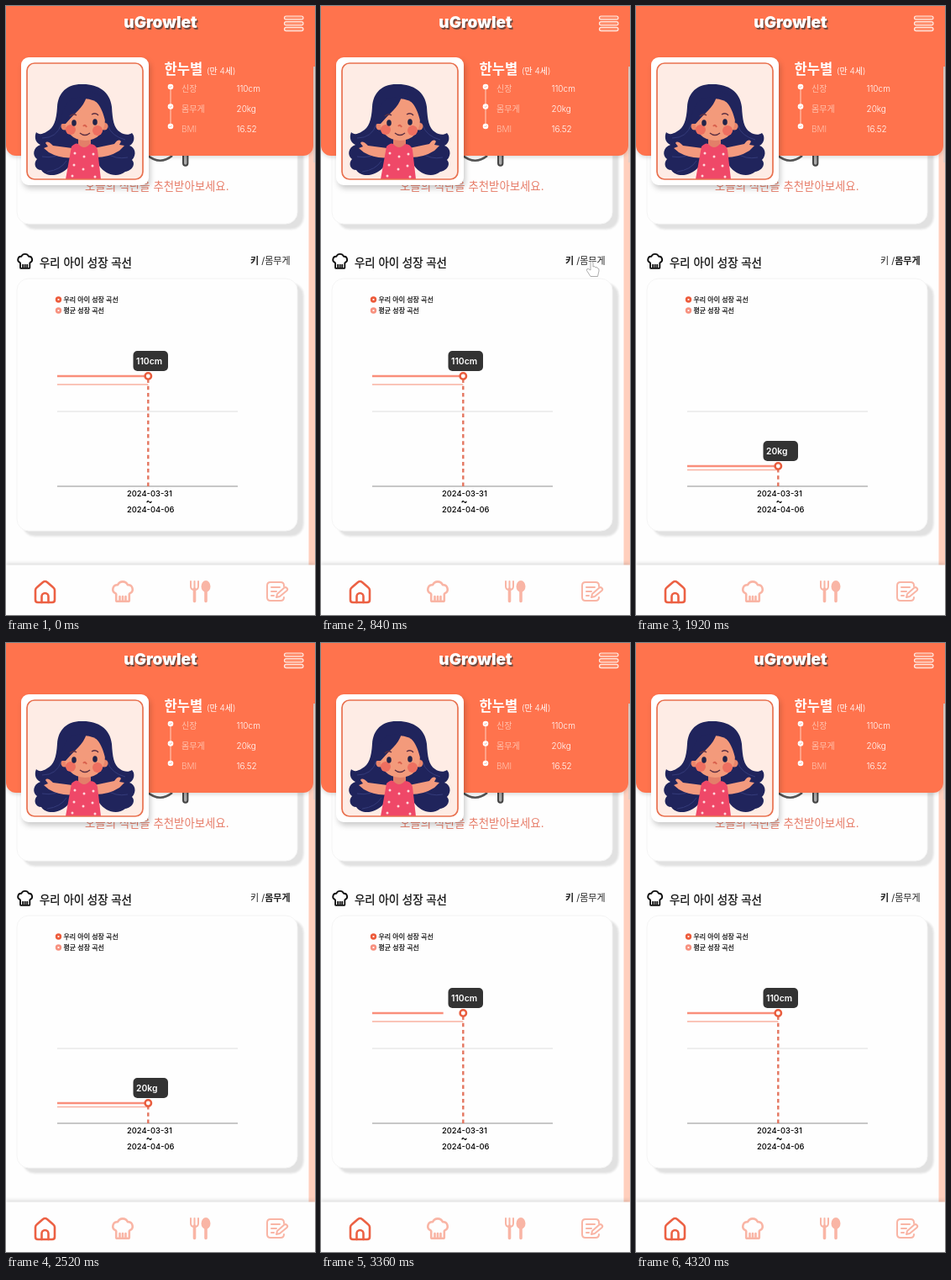
Recreate the animation shown at these times as an HTML page. Size 368 by 724 pixels, loop 4.56 s.

```html
<!DOCTYPE html>
<html lang="ko">
<head>
<meta charset="utf-8">
<title>성장 곡선</title>
<style>
  html, body { margin: 0; width: 100%; height: 100%; overflow: hidden; background: #fefefe; }
  svg { display: block; width: 100%; height: 100%; }
  text { font-family: Inter, "Noto Sans CJK KR", "Noto Sans CJK", sans-serif; white-space: pre; }
  .card { fill: #fefefe; stroke: #f4f4f4; filter: drop-shadow(7px 6px 1px #e1e1e1); }
  .photo { fill: #fff; filter: drop-shadow(2px 4px 3px #0003); }
  .icon { fill: none; stroke-width: 2; stroke-linecap: round; stroke-linejoin: round; }
  .home { stroke: #ec6144; stroke-width: 2.6; }
  .salmon { stroke: #f9b5a5; }
  .light { fill: #fff; font-size: 10px; font-weight: 300; }
  .label { fill: #ffc3af; font-size: 10px; font-weight: 300; }
  .medium { stroke: #111; stroke-width: .3; }
  .legend { font-size: 8px; font-weight: 500; stroke-width: .2; }
  .date { font-size: 9.4px; font-weight: 500; }
</style>
</head>
<body>
<svg viewBox="0 0 368 724" preserveAspectRatio="none">
  <defs>
    <path id="chef" d="M17 21a1 1 0 0 0 1-1v-5.4c0-.4.3-.8.7-1a4 4 0 0 0-2.1-7.6a5 5 0 0 0-9.2 0a4 4 0 0 0-2.1 7.6c.4.2.7.6.7 1V20a1 1 0 0 0 1 1ZM9.300 20.500v-4M12 20.500v-4M14.700 20.500v-4"/>
    <clipPath id="frame"><rect x="25" y="68" width="138" height="138" rx="9"/></clipPath>
  </defs>

  <rect width="368" height="724" fill="#fefefe"/>
  <rect x="360.5" y="72" width="8" height="594" fill="#ffcfbd"/>
  <path d="M367 72V186" stroke="#e3cfc8" stroke-width="2"/>

  <!-- meal card -->
  <rect class="card" x="13" y="120" width="334" height="139" rx="14"/>
  <path d="M168 177Q183 190 198 178" fill="none" stroke="#555" stroke-width="2.5"/>
  <path d="M211 170V187a2.7 2.7 0 0 0 5.4 0V170" fill="#aaa" stroke="#444" stroke-width="2"/>
  <text x="94" y="219" font-size="13.4" fill="#e77c68">오늘의 식단을 추천받아보세요.</text>

  <!-- header -->
  <path d="M0 0H368V72H366V166a12 12 0 0 1-12 12H12a12 12 0 0 1-12-12Z" fill="#ff734d" style="filter:drop-shadow(0 2px 2px #0002)"/>
  <text x="184" y="26" text-anchor="middle" font-size="19" font-weight="900" fill="#fff" style="text-shadow:1.5px 1.5px 0 #70483d">uGrowlet</text>
  <g fill="#ff8e6d" stroke="#ffe9e1" stroke-width="1.2">
    <rect x="331.5" y="12" width="22.5" height="4.2" rx="2.1"/>
    <rect x="331.5" y="18.7" width="22.5" height="4.2" rx="2.1"/>
    <rect x="331.5" y="25.4" width="22.5" height="4.2" rx="2.1"/>
  </g>
  <text x="188.5" y="81" font-size="16.6" font-weight="700" fill="#fff">한누별</text>
  <text x="239" y="81" class="light">(만 4세)</text>
  <path d="M196 96V143" stroke="#ffd3c4"/>
  <g fill="#fff">
    <circle cx="196" cy="96" r="3.3"/><circle cx="196" cy="119.5" r="3.3"/><circle cx="196" cy="143" r="3.3"/>
  </g>
  <path d="M194.5 96l1 1 2-2M194.5 119.5l1 1 2-2M194.5 143l1 1 2-2" fill="none" stroke="#ff9b7f" stroke-width=".8"/>
  <text x="209" y="101.5" class="label">신장</text><text x="274.5" y="101.5" class="light">110cm</text>
  <text x="209" y="125.5" class="label">몸무게</text><text x="274.5" y="125.5" class="light">20kg</text>
  <text x="209" y="149.5" class="label">BMI</text><text x="274.5" y="149.5" class="light">16.52</text>

  <!-- portrait -->
  <rect class="photo" x="18" y="61" width="152" height="152" rx="9"/>
  <g clip-path="url(#frame)">
    <rect x="25" y="68" width="138" height="138" fill="#feece5"/>
    <path d="M92 93C74 92 62 102 61 120C60 136 57 145 49 149C43 153 39 153 36 150C33 157 36 163 41 165C32 168 31 178 37 182C32 187 35 195 42 195C48 204 64 203 74 192L111 190C118 200 132 205 142 197C150 196 155 188 150 183C156 177 154 168 147 166C153 163 154 155 150 151C146 154 140 153 136 150C128 145 127 135 126 120C124 102 110 93 92 93Z" fill="#20245c"/>
    <path d="M43 157Q61 157 66 140M43 179Q60 182 69 172M142 159Q126 155 121 142M145 180Q130 183 119 174M49 197Q65 195 72 184" fill="none" stroke="#343b7a"/>
    <path d="M79 169L56 166Q49 159 47 163L50 167L45 169L51 174Q65 182 81 180ZM105 169L129 164Q134 157 137 161L135 165L141 166L135 172Q121 181 103 180Z" fill="#f39a7e"/>
    <path d="M86 155H101V172H86Z" fill="#e37f69"/>
    <path d="M78 167Q83 162 86 164Q93 172 100 164Q107 164 109 171L113 206H71Z" fill="#ef4868"/>
    <g fill="#ffd8dc">
      <circle cx="82" cy="175" r="1.5"/><circle cx="93" cy="179" r="1.5"/><circle cx="104" cy="176" r="1.5"/>
      <circle cx="81" cy="189" r="1.5"/><circle cx="92" cy="194" r="1.5"/><circle cx="103" cy="190" r="1.5"/>
      <circle cx="79" cy="202" r="1.5"/><circle cx="106" cy="203" r="1.5"/>
    </g>
    <circle cx="70" cy="143" r="4.5" fill="#ea866b"/><circle cx="117" cy="143" r="4.5" fill="#ea866b"/>
    <path d="M69 132Q69 112 93 110Q118 112 118 135Q117 159 94 160Q71 159 69 132Z" fill="#f39a7b"/>
    <path d="M66 140C66 117 75 107 96 108C92 121 82 127 71 140ZM93 107C109 109 115 122 119 140C126 124 118 104 99 101Z" fill="#20245c"/>
    <circle cx="77" cy="147" r="6" fill="#ee6f60"/><circle cx="109" cy="148" r="6" fill="#ee6f60"/>
    <ellipse cx="81" cy="139" rx="2.8" ry="3.8" fill="#222449"/><ellipse cx="106" cy="138" rx="2.8" ry="3.8" fill="#222449"/>
    <path d="M76 131Q80 127 84 130M102 129Q107 126 110 130M88 151Q94 156 100 151" fill="none" stroke="#5d3042" stroke-width="1.4"/>
    <path d="M92 143Q94 140 96 144" fill="none" stroke="#d9614e" stroke-width="2"/>
  </g>
  <rect x="25" y="68" width="138" height="138" rx="9" fill="none" stroke="#e9714f" stroke-width="1.7"/>

  <!-- growth section -->
  <use href="#chef" class="icon" stroke="#111" transform="translate(11.4 292.1) scale(.94)"/>
  <text x="40" y="310" class="medium" font-size="13.4" fill="#111">우리 아이 성장 곡선</text>
  <text x="291" y="307" font-size="11" fill="#222"><tspan id="heightTab">키</tspan> /<tspan id="weightTab">몸무게</tspan></text>
  <rect class="card" x="13" y="324" width="334" height="300" rx="14"/>
  <g fill="#fff" stroke-width="2.6">
    <circle cx="62.5" cy="349" r="2.4" stroke="#ed5b3b"/><circle cx="62.5" cy="362" r="2.4" stroke="#f7917f"/>
  </g>
  <text x="68.5" y="352" class="medium legend">우리 아이 성장 곡선</text>
  <text x="68.5" y="365" class="medium legend">평균 성장 곡선</text>
  <path d="M61 482H276" stroke="#dedede"/>
  <path d="M61 571H276" stroke="#b5b5b5" stroke-width="1.3"/>
  <path id="average" stroke="#f8b0a1" stroke-width="1.7"/>
  <path id="growth" stroke="#f98e7b" stroke-width="2.4"/>
  <path id="drop" stroke="#e4755f" stroke-width="2.4" stroke-dasharray="4.5 3.7"/>
  <g id="marker">
    <circle cx="169.3" cy="440" r="3.7" fill="#fff" stroke="#e95d3e" stroke-width="2.5"/>
    <rect x="151.5" y="410" width="41.5" height="24" rx="5" fill="#333"/>
    <text id="value" x="155" y="426" font-size="10.4" font-weight="600" fill="#fff"></text>
  </g>
  <text x="144" y="583" class="date">2024-03-31</text>
  <text x="170.5" y="593" font-size="12" font-weight="600" text-anchor="middle">~</text>
  <text x="144" y="601.5" class="date">2024-04-06</text>

  <!-- navigation -->
  <rect y="664.5" width="368" height="60" fill="#fefefe" style="filter:drop-shadow(0 -2px 2px #0002)"/>
  <g class="icon home">
    <path d="M35 694.5Q35 692.5 37 691L44 685Q46.5 683 49 685L56 691Q58 692.5 58 694.5V706Q58 709 55 709H38Q35 709 35 706Z"/>
    <path d="M42.5 709V702a4 4 0 0 1 8 0V709"/>
  </g>
  <use href="#chef" class="icon salmon" transform="translate(123.4 680.5) scale(1.3)"/>
  <g class="icon salmon">
    <path d="M220 684V690Q220 694 224.5 694Q229 694 229 690V684M224.5 684V694"/>
    <path d="M224.5 693V707.5M238 696V707.5" style="stroke-width:3.6"/>
    <ellipse cx="238" cy="690" rx="4.5" ry="6" fill="#f9b5a5"/>
    <path d="M331 690V689Q331 685 327 685H315Q311 685 311 689V703Q311 707 315 707H327Q331 707 331 703M316 691H326M316 696H322M316 701H319"/>
    <path d="M322 703L323 699L331.5 691.5Q333 690.5 334.5 692Q336 693.5 334.5 695L326 702Z"/>
  </g>

  <path id="cursor" d="M298 314V305.5Q298 303.5 299.5 303.5Q301 303.5 301 305.5V310Q303 308.5 304 311Q306 309.5 306.5 312Q308.5 311.5 308 315L306.5 321.5H298L293.5 314.5Q293 312 295.5 312.5Z" fill="#fff" stroke="#999" stroke-width=".8"/>
</svg>
<script>
const LOOP = 4560, STEP = 120, LAST = 4320;
const TO_WEIGHT = 960, TO_HEIGHT = 2880, DRAW = 1000;
const LEFT = 61, RIGHT = 169.3, BASE = 571;
const el = id => document.getElementById(id);
const between = (t, from, to) => t >= from && t < to;

// cubic-bezier(.25, .1, .25, 1)
function ease(x) {
  if (x >= 1) return 1;
  let low = 0, high = 1, u;
  for (let i = 0; i < 20; i++) {
    u = (low + high) / 2;
    if (.75 * u * (1 - u) + u ** 3 < x) low = u; else high = u;
  }
  return .3 * u * (1 - u) ** 2 + 3 * u * u * (1 - u) + u ** 3;
}

function render(t) {
  const weight = between(t, TO_WEIGHT, TO_HEIGHT);
  const start = weight ? TO_WEIGHT : t >= TO_HEIGHT ? TO_HEIGHT : -DRAW;
  const end = LEFT + (RIGHT - LEFT) * ease((t - start) / DRAW);
  const y = weight ? 547 : 440;

  el("heightTab").setAttribute("font-weight", weight ? 400 : 700);
  el("weightTab").setAttribute("font-weight", weight ? 700 : 400);
  el("growth").setAttribute("d", `M${LEFT} ${y}H${end}`);
  el("average").setAttribute("d", `M${LEFT} ${weight ? 551.5 : 450}H${RIGHT}`);
  el("drop").setAttribute("d", `M${RIGHT} ${BASE}V${y}`);
  el("marker").setAttribute("transform", `translate(0 ${y - 440})`);
  el("value").textContent = weight ? "20kg" : "110cm";

  const overWeight = between(t, TO_WEIGHT - STEP, TO_WEIGHT + STEP);
  const overHeight = between(t, TO_HEIGHT - STEP, TO_HEIGHT + STEP);
  el("cursor").setAttribute("visibility", overWeight || overHeight ? "visible" : "hidden");
  el("cursor").setAttribute("transform", `translate(${overWeight ? 23 : 0} 0)`);
}

function tick() {
  const t = performance.now() % LOOP;
  render(Math.min(Math.floor(t / STEP) * STEP, LAST));
  requestAnimationFrame(tick);
}
tick();
</script>
</body>
</html>
```
